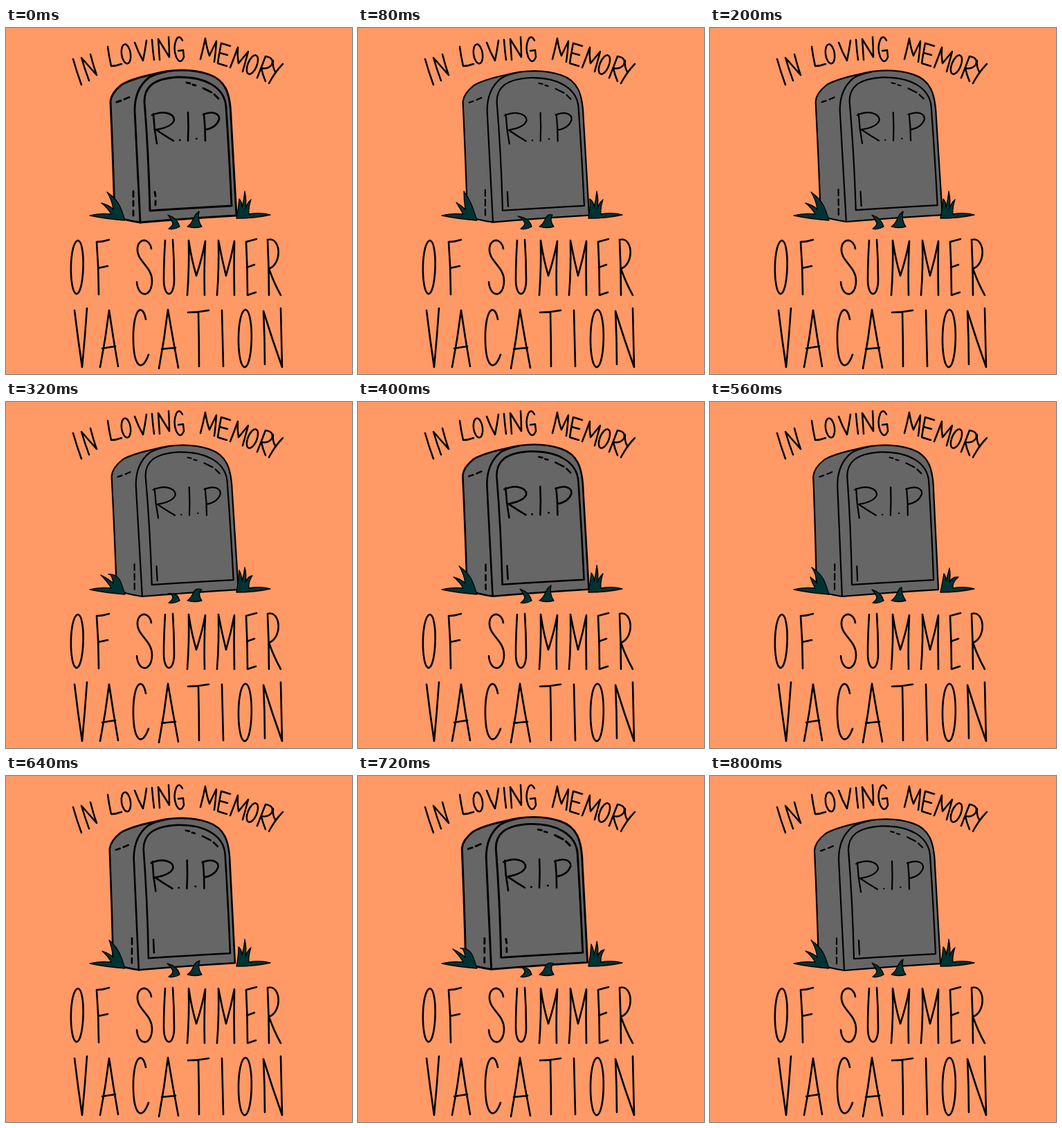
Recreate the animation shown at these times as an HTML page. Size 500x500 px, loop 0.84 s.

```html
<!DOCTYPE html>
<html lang="en">
<head>
<meta charset="utf-8">
<title>In loving memory of summer vacation</title>
<style>
  html, body { margin: 0; width: 100%; height: 100%; overflow: hidden; background: #ff9966; }
  svg { display: block; width: 100vw; height: 100vh; }
  path, ellipse { stroke: #000; stroke-linecap: round; stroke-linejoin: round; fill: none; }
  #stone .body { fill: #666; }
  #grass path { fill: #033; stroke-width: 1.3; }
</style>
</head>
<body>
<svg viewBox="0 0 500 500" role="img" aria-label="In loving memory of summer vacation. R.I.P">
  <g stroke-width="2.5">
    <!-- IN -->
    <path d="M97 45Q102 63 109 82"/>
    <path d="M120 76Q114 60 109 43L131 68Q126 54 122 38"/>
    <!-- LOVING -->
    <path d="M147 27Q149 42 152 55Q159 55 167 52"/>
    <ellipse cx="173.5" cy="37.5" rx="6.5" ry="14" transform="rotate(-8 173.5 37.5)"/>
    <path d="M186 21Q191 35 198 47Q201 33 203 18"/>
    <path d="M211 17Q212 32 214 46"/>
    <path d="M222 46Q221 31 220 16L236 42Q236 28 235 13"/>
    <path d="M255 18Q250 9 246 17Q241 29 246 42Q252 54 257 42L256 32L249 33"/>
    <!-- MEMORY -->
    <path d="M281 45Q285 30 288 15Q290 29 294 40Q299 29 304 19Q303 35 301 49"/>
    <path d="M324 26L311 22Q308 37 306 51L319 55M309 36L320 39"/>
    <path d="M324 57Q330 42 335 28Q334 40 336 51L350 34Q346 49 342 63"/>
    <ellipse cx="356" cy="53" rx="6.5" ry="14.5" transform="rotate(22 356 53)"/>
    <path d="M363 72Q369 57 375 41Q388 43 384 53Q379 60 369 58Q371 68 375 77"/>
    <path d="M386 47Q385 57 389 63M400 52Q389 63 380 80"/>
  </g>
  <g stroke-width="2.6">
    <!-- OF -->
    <path d="M104 307C91 310 91 379 101 384C113 388 116 309 104 307Z"/>
    <path d="M149 306Q140 309 131 309Q134 347 134 385M133 347L147 344"/>
    <!-- SUMMER -->
    <path d="M210 319C208 304 192 302 190 318C188 337 211 344 211 365C211 390 191 391 189 367"/>
    <path d="M230 307Q228 338 228 363C228 392 243 390 243 364Q243 335 241 306"/>
    <path d="M262 386Q265 346 264 307Q268 334 275 358Q283 334 288 308Q286 348 287 386"/>
    <path d="M305 386Q308 346 307 307Q312 334 318 358Q325 334 330 308Q329 348 330 386"/>
    <path d="M362 305L347 309Q349 347 349 386L361 382M348 346L359 342"/>
    <path d="M380 386Q380 345 378 306C397 301 400 340 380 348Q387 368 397 386"/>
    <!-- VACATION -->
    <path d="M99 408Q104 450 110 490Q114 448 117 405"/>
    <path d="M136 490Q144 449 149 408Q155 449 162 489M139 463L158 460"/>
    <path d="M202 421C198 399 186 402 184 441C183 490 196 500 206 472"/>
    <path d="M221 492Q229 449 234 407Q241 449 249 491M225 464L245 462"/>
    <path d="M263 411Q278 411 293 408M278 410Q279 450 279 489"/>
    <path d="M312 408Q313 449 314 489"/>
    <path d="M346 407C333 410 333 485 344 490C357 493 359 409 346 407Z"/>
    <path d="M374 486Q374 448 372 409Q385 451 399 490Q398 447 397 405"/>
  </g>
  <g id="stone">
    <path class="body" d="M157 272Q155 195 151 106Q152 94 167 82Q180 74 212 67C240 59 270 59 293 67C317 75 324 94 325 128Q329 200 333 271Q265 275 194 281Q173 278 157 272Z"/>
    <path d="M194 281Q190 200 186 119Q186 88 206 72Q216 66 232 63"/>
    <path d="M208 264Q206 180 200 106C200 86 212 73 248 71C288 70 316 86 318 114Q323 190 326 257Q270 260 208 264Z"/>
    <path d="M160 107L166 105M171 103L178 100M261 79L266 80M270 82L274 83M285 87L297 93M301 96L307 102"/>
    <path id="dashes"/>
    <g id="rip">
      <path d="M213 124Q214 146 218 167M211 126C228 118 243 124 243 133Q240 143 217 147Q230 156 242 163"/>
      <path d="M251 162h.5M263 122Q264 143 263 163M275 160h.5"/>
      <path d="M286 124Q288 143 288 163M285 125C299 119 309 124 308 132Q304 144 288 147"/>
    </g>
  </g>
  <g id="grass"><path/><path/><path/><path/></g>
</svg>
<script>
const STEP = 40, COUNT = 21;
const get = id => document.getElementById(id);
const stone = get('stone'), dashes = get('dashes'), rip = get('rip');
const blades = get('grass').children;

// step, sideways sway, lift
const sway = [
  [0, 0, 0], [5, 2.6, -1], [8, 2.6, 0], [12, -1.5, -.5],
  [14, -2.8, 0], [18, -1.2, -1.6], [20, 0, 0]
];

// line weight, top drop and corner dashes of the boiling outline
const inks = [
  { w: 2.9, drop: 0, d: 'M184 236V244M184 250V257M184 264V271M215 237L216 243M216 250V256' },
  { w: 2.6, drop: .7, d: 'M184 235V244M184 250V258M184 264V271M215 237L216 256' },
  { w: 2.2, drop: 1.4, d: 'M183 234V243M183 248V257M183 262V271M215 237L216 258' }
];

// blade tips: two left, three right, two in the middle
const tips = [
  [[138, 253], [146, 237], [337, 247], [345, 236], [354, 248], [234, 270], [279, 265]],
  [[139, 253], [149, 237], [336, 247], [345, 236], [354, 248], [233, 271], [280, 267]],
  [[142, 252], [153, 236], [335, 247], [345, 236], [354, 248], [231, 272], [281, 270]],
  [[137, 250], [148, 249], [337, 243], [345, 239], [356, 251], [234, 277], [283, 271]],
  [[145, 253], [147, 239], [338, 248], [346, 240], [359, 253], [234, 271], [277, 268]]
];

function swayAt(n) {
  const i = Math.max(1, sway.findIndex(k => k[0] >= n));
  const a = sway[i - 1], b = sway[i];
  const u = (n - a[0]) / (b[0] - a[0]), e = u * u * (3 - 2 * u);
  return [1, 2].map(j => a[j] + (b[j] - a[j]) * e);
}

function drawStone(n) {
  const [dx, dy] = swayAt(n), ink = inks[n % 3];
  const squash = 1 - ink.drop / 220;
  const y0 = dy + ink.drop * 281 / 220;
  stone.setAttribute('transform', `matrix(1 0 ${.0027 * dx} ${squash} ${.34 * dx} ${y0})`);
  stone.setAttribute('stroke-width', ink.w);
  rip.setAttribute('stroke-width', Math.min(ink.w, 2.6));
  dashes.setAttribute('d', ink.d);
}

function drawGrass(n) {
  const [a, b, c, d, e, f, g] = tips[n % 5];
  const shapes = [
    `M121 271Q136 267 152 269Q147 260 ${a}Q149 256 155 262Q153 248 ${b}Q162 248 167 263L172 278Q145 276 121 271Z`,
    `M333 275Q336 260 ${c}Q341 251 341 259Q344 248 ${d}Q348 249 346 261Q349 252 ${e}Q350 260 351 269Q367 266 382 270Q360 275 333 275Z`,
    `M${f}Q248 275 251 287Q243 292 235 290Q241 286 241 282Q239 276 ${f}Z`,
    `M${g}Q276 277 283 287Q272 290 262 287Q268 283 271 275Q274 268 ${g}Z`
  ];
  shapes.forEach((s, i) => blades[i].setAttribute('d', s));
}

function draw(now) {
  const n = Math.floor(now / STEP) % COUNT;
  drawStone(n);
  drawGrass(n);
}

const start = performance.now();
function tick() {
  draw(performance.now() - start);
  requestAnimationFrame(tick);
}
tick();
</script>
</body>
</html>
```
